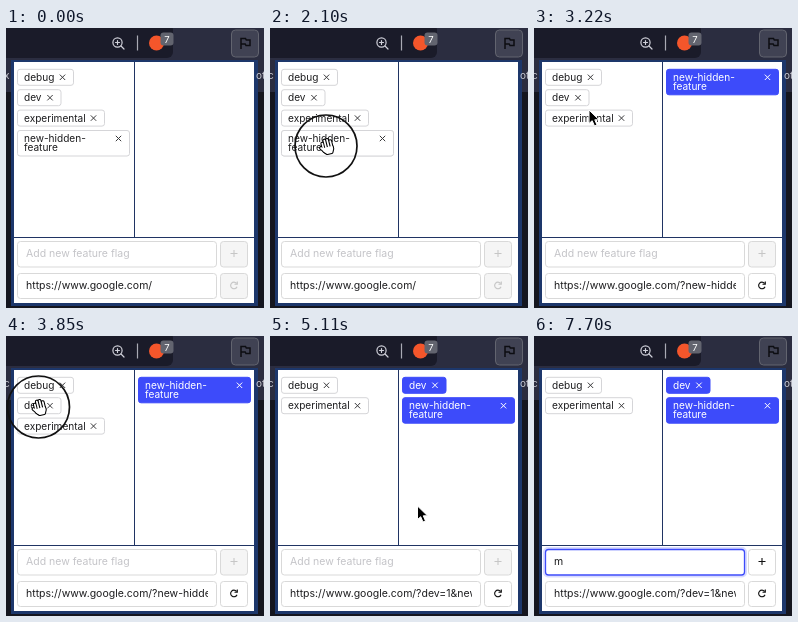
Recreate the animation shown at these times as an HTML page. Size 258x280 px, loop 8000 ms.

```html
<!DOCTYPE html>
<html lang="en">
<head>
<meta charset="utf-8">
<title>Feature flags</title>
<style>
  html, body { margin: 0; width: 100%; height: 100%; overflow: hidden; background: #15161f; }
  svg { display: block; width: 258px; height: 280px; font-family: Inter, Roboto, sans-serif; }
  .chip rect { fill: #fff; stroke: #d5d5d8; }
  .chip text { fill: #1d1d1f; font-size: 10.1px; }
  .chip path { stroke: #3a3a3c; stroke-width: 1; }
  .chip.on rect { fill: #3d4bfa; stroke: #3d4bfa; }
  .chip.on text { fill: #fff; }
  .chip.on path { stroke: #fff; }
  .field { fill: #fff; stroke: #d9d9d9; }
  .button { stroke: #d9d9d9; }
  .label { font-size: 10.5px; fill: #1d1d1f; }
  .rule { stroke: #203463; }
</style>
</head>
<body>
<svg viewBox="0 0 258 280">
  <defs>
    <clipPath id="urlClip"><rect x="18" y="246" width="184" height="24"/></clipPath>
    <g id="handShape" stroke-linecap="round" stroke-linejoin="round">
      <path d="M-4 3V-3.500M-1.300 2V-6M1.500 2V-6M4.300 3V-4M-6.300 .500L-3 5"/>
      <path d="M-3.500 2H4.500V4L3 7H-1.500L-4 4Z"/>
    </g>
    <path id="beamShape" d="M-3.500 -8Q0 -8 0 -6Q0 -8 3.500 -8M0 -6V6M-3.500 8Q0 8 0 6Q0 8 3.500 8M-2 3H2"/>
  </defs>

  <!-- browser toolbar and page behind the popup -->
  <rect width="258" height="280" fill="#15161f"/>
  <rect width="258" height="64" fill="#2b2d40"/>
  <rect x="-20" y="-4" width="187" height="34" rx="6" fill="#1a1b29"/>
  <g fill="none" stroke="#d0d1da" stroke-width="1.200" stroke-linecap="round">
    <circle cx="111.500" cy="14.500" r="4.600"/>
    <path d="M115 18L118 21M109.500 14.500H113.500M111.500 12.500V16.500"/>
    <path d="M131.500 7.500V22.500" stroke="#a9aab4" stroke-linecap="butt"/>
  </g>
  <circle cx="150.500" cy="15" r="7.500" fill="#f4562b"/>
  <rect x="154.500" y="4.500" width="13" height="13" rx="3" fill="#62646f"/>
  <text x="161" y="14.500" font-size="9.500" fill="#fff" text-anchor="middle">7</text>
  <rect x="225.500" y="2" width="27" height="27" rx="4" fill="#404253" stroke="#62646f"/>
  <path d="M235 21V10.500H239.500L240.300 12H244V17.500H240L239.200 16H235" fill="none" stroke="#0c0d12" stroke-width="1.500"/>
  <text id="pageEdge" x="-2" y="51" font-size="10" fill="#c9cad2">x</text>

  <!-- popup -->
  <rect x="5" y="32" width="247" height="246" fill="#1d376b"/>
  <text x="250" y="51" font-size="10" fill="#c9cad2">ot</text>
  <rect x="8" y="34" width="240" height="241" fill="#fff"/>
  <path class="rule" d="M128.500 34V209.500M8 209.500H248"/>
  <rect id="halo" x="10" y="212" width="202" height="28.500" rx="4" fill="none" stroke="#3d4bfa" stroke-opacity=".2" stroke-width="2"/>
  <rect id="flagField" class="field" x="11.500" y="213.500" width="199" height="25.500" rx="3"/>
  <text id="flagText" class="label" y="229.200"></text>
  <path id="caret" d="M20.500 219V232" stroke="#111" stroke-width="1.300"/>
  <rect class="field" x="11.500" y="245.500" width="199" height="25" rx="3"/>
  <text id="url" class="label" x="20" y="261" clip-path="url(#urlClip)"></text>
  <rect id="addButton" class="button" x="214.500" y="213.500" width="27" height="25.500" rx="3"/>
  <path id="addIcon" d="M224.500 225.500H231.500M228 222V229" stroke="#111" stroke-width="1.100"/>
  <rect id="reloadButton" class="button" x="214.500" y="245.500" width="27" height="25" rx="3"/>
  <path id="reloadIcon" d="M231 258.700A3.300 3.300 0 1 1 230.500 255.400M231.300 253.400V256.200H228.500" fill="none" stroke="#111" stroke-width="1.150"/>

  <g id="chips"></g>
  <ellipse id="release" rx="29" ry="17" fill="#000" fill-opacity=".055"/>
  <g id="ghosts" opacity=".7"></g>

  <g id="pointer">
    <circle id="press" r="31" fill="none" stroke="#111" stroke-width="1.700"/>
    <path id="arrow" d="M0 0V13.500L3.200 10.700L5.500 16L8 15L5.800 9.800H10Z" fill="#000" stroke="#fff" stroke-width="1" stroke-linejoin="round"/>
    <g id="hand" fill="none" transform="translate(1 0) rotate(-14)">
      <use href="#handShape" stroke="#000" stroke-width="3.800"/>
      <use href="#handShape" stroke="#fff" stroke-width="1.700" fill="#fff"/>
    </g>
    <g id="beam" fill="none">
      <use href="#beamShape" stroke="#fff" stroke-width="2.600"/>
      <use href="#beamShape" stroke="#111" stroke-width="1.300"/>
    </g>
  </g>
</svg>
<script>
const LOOP = 8000, TICK = 70;
const $ = id => document.getElementById(id);

const chipSpecs = {
  debug: { lines: ['debug'], width: 57, height: 17 },
  dev: { lines: ['dev'], width: 44.5, height: 17 },
  experimental: { lines: ['experimental'], width: 88, height: 17 },
  hidden: { lines: ['new-hidden-', 'feature'], width: 113, height: 26.5 }
};

// time, x, y of the pointer hotspot
const route = [
  [70, 138, 256], [210, 115, 235], [280, 115, 235], [910, 71, 121],
  [1330, 71, 121], [1610, 56, 118], [2100, 56, 118], [2310, 165, 118],
  [2520, 165, 118], [3220, 55, 82], [3710, 32.5, 71],
  [3850, 32.5, 71], [4270, 135, 104], [4690, 135, 104], [5530, 160, 236]
];

const drags = [
  { chip: 'hidden', from: 1820, cross: 2240, release: 2310, drop: 2450, dx: -45, dy: -16 },
  { chip: 'dev', from: 3850, cross: 4200, release: 4410, drop: 4480, dx: -21.5, dy: -9 }
];

function makeChip(name, parent) {
  const { lines, width, height } = chipSpecs[name];
  const x = width - 11.5;
  const g = document.createElementNS('http://www.w3.org/2000/svg', 'g');
  g.setAttribute('class', 'chip');
  g.innerHTML = `<rect x=".5" y=".5" width="${width - 1}" height="${height - 1}" rx="2.5"/>` +
    lines.map((line, i) => `<text x="7" y="${12 + i * 9.3}">${line}</text>`).join('') +
    `<path d="M${x - 2.7} 5.8l5.4 5.4m0 -5.4l-5.4 5.4"/>`;
  parent.append(g);
  return g;
}

const chips = {}, ghosts = {};
for (const name in chipSpecs) chips[name] = makeChip(name, $('chips'));
for (const { chip } of drags) ghosts[chip] = makeChip(chip, $('ghosts'));

const between = (t, a, b) => t >= a && t < b;
const ramp = (t, a, b) => Math.min(1, Math.max(0, (t - a) / (b - a)));
const place = (el, x, y) => el.setAttribute('transform', `translate(${x} ${y})`);
const show = (el, on) => { el.style.display = on ? '' : 'none'; };

function pointerAt(t) {
  const next = route.findIndex(p => p[0] > t);
  if (next < 0) return route[route.length - 1].slice(1);
  if (next === 0) return route[0].slice(1);
  const [a, x, y] = route[next - 1], [b, x2, y2] = route[next];
  const p = ramp(t, a, b), k = p * p * (3 - 2 * p);
  return [x + (x2 - x) * k, y + (y2 - y) * k];
}

function stack(names, x) {
  let y = 40.8;
  for (const name of names) {
    place(chips[name], x, y);
    y += chipSpecs[name].height + 3.4;
  }
}

function layoutChips(t) {
  const [hidden, dev] = drags;
  const moved = drags.filter(d => t >= d.cross).map(d => d.chip);
  stack(Object.keys(chipSpecs).filter(name => !moved.includes(name)), 11);
  stack(t >= dev.drop ? ['dev', 'hidden'] : moved, 132);
  chips.hidden.classList.toggle('on', t >= hidden.drop);
  chips.dev.classList.toggle('on', t >= dev.drop);
}

function enable(name, k) {
  const shade = 245 + 10 * k;
  $(name + 'Button').style.fill = `rgb(${shade},${shade},${shade})`;
  $(name + 'Icon').style.opacity = 0.2 + 0.8 * k;
}

function drawForm(t) {
  const typed = t >= 7210, focused = t >= 5950;
  const query = t < 2450 ? '' : t < 4480 ? '?new-hidden-feature=1' : '?dev=1&new-hidden-feature=1';
  $('url').textContent = 'https://www.google.com/' + query;
  $('flagText').textContent = typed ? 'm' : 'Add new feature flag';
  $('flagText').style.fill = typed ? '#1d1d1f' : '#c4c4c8';
  $('flagText').setAttribute('x', focused && !typed ? 23 : 20);
  $('flagField').style.stroke = focused ? '#3d4bfa' : t >= 5460 ? '#6873fb' : '#d9d9d9';
  $('flagField').style.strokeWidth = focused ? 1.3 : 1;
  $('halo').style.opacity = ramp(t, 5880, 6090);
  place($('caret'), typed ? 9 : 0, 0);
  show($('caret'), between(t, 5950, 6440) || between(t, 7000, 7700));
  enable('add', ramp(t, 7140, 7350));
  enable('reload', ramp(t, 2520, 2800));
}

function drawPointer(t) {
  const [x, y] = pointerAt(t);
  const hand = between(t, 1400, 2450) || between(t, 3640, 4480);
  place($('pointer'), x, y);
  show($('pointer'), between(t, 70, 7210));
  show($('hand'), hand);
  show($('beam'), t >= 5600);
  show($('arrow'), !hand && t < 5600);
  show($('press'), drags.some(d => between(t, d.from, d.release)));
  place($('release'), x + 1.5, y + 1.5);
  show($('release'), drags.some(d => between(t, d.release, d.drop)));
  for (const d of drags) {
    place(ghosts[d.chip], x + d.dx, y + d.dy);
    show(ghosts[d.chip], between(t, d.from + TICK, d.drop));
  }
}

function draw(now) {
  const t = Math.floor(now % LOOP / TICK) * TICK;
  $('pageEdge').textContent = t < 1260 ? 'x' : 'c';
  layoutChips(t);
  drawForm(t);
  drawPointer(t);
}

const start = performance.now();
function tick() {
  draw(performance.now() - start);
  requestAnimationFrame(tick);
}
tick();
</script>
</body>
</html>
```
